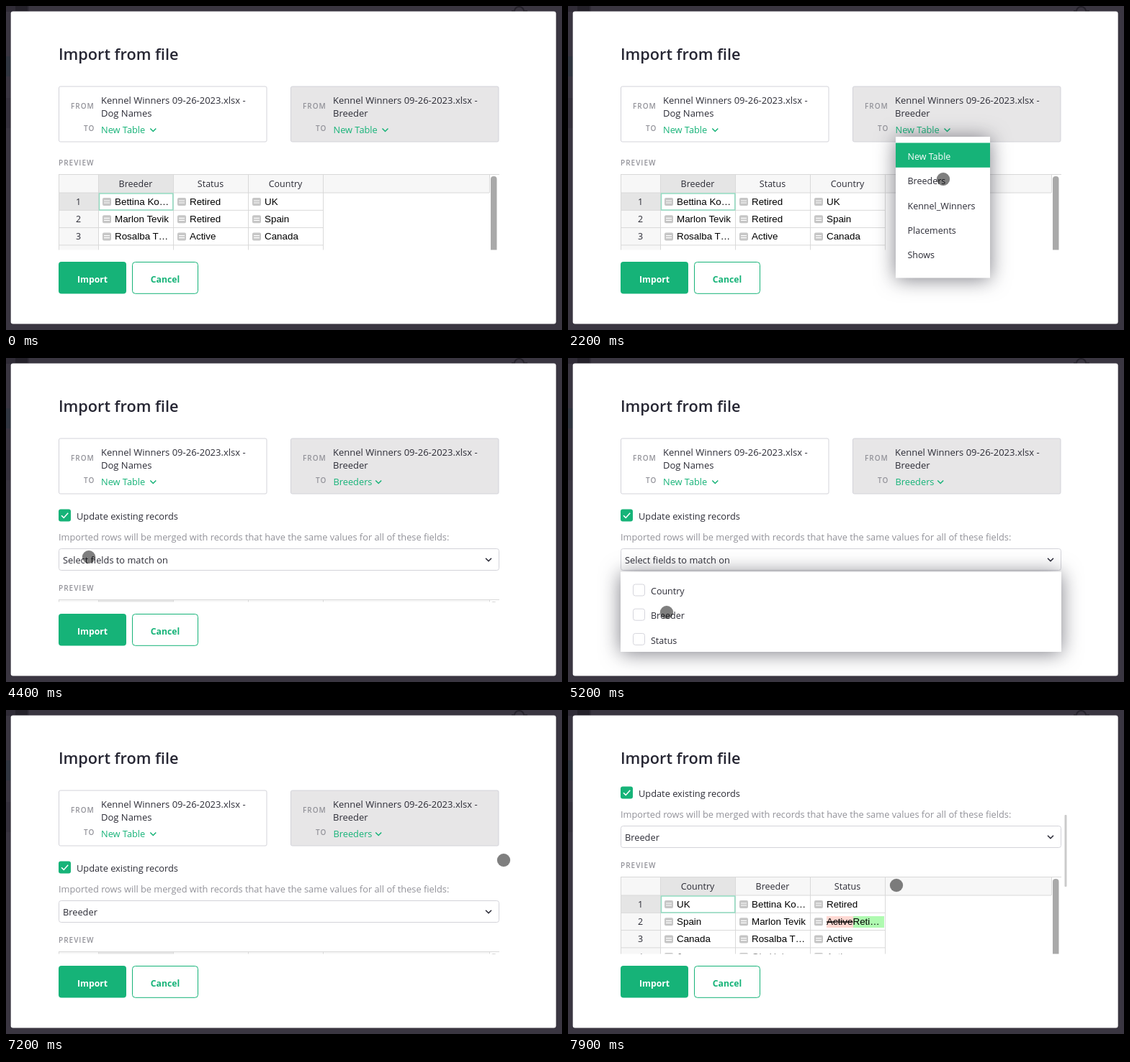
Animation of 772x451 px, one loop 8 s. Source, as an HTML page:

```html
<!DOCTYPE html>
<html lang="en">
<head>
<meta charset="utf-8">
<title>Import from file</title>
<style>
html, body { margin: 0; width: 100%; height: 100%; overflow: hidden; background: #3a3641; }
svg { display: block; width: 772px; height: 451px; }
text { font: 12.8px "Open Sans", "Noto Sans", sans-serif; fill: #2c2c36; white-space: pre; }
.title { font-size: 21.7px; font-weight: 600; fill: #262633; }
.file { font-size: 13px; }
.label { font-size: 10px; font-weight: 600; letter-spacing: 1px; fill: #929299; }
.note { fill: #929299; }
.link { fill: #16b378; }
.light { fill: #fff; }
.mid { font-size: 12.5px; text-anchor: middle; }
.button { font-size: 12.2px; font-weight: 700; }
.item { font-size: 12.5px; }
.cell { font: 13.4px "Liberation Sans", Arial, sans-serif; fill: #000; }
.menu { filter: drop-shadow(0 2px 14px rgba(38, 38, 51, .6)); }
</style>
</head>
<body>
<svg id="stage" viewBox="0 0 772 451"></svg>
<script>
const GREEN = '#16b378', LINE = '#d9d9d9';

const text = (x, y, s, cls = '') => `<text x="${x}" y="${y}" class="${cls}">${s}</text>`;
const rect = (x, y, w, h, fill, extra = '') =>
  `<rect x="${x}" y="${y}" width="${w}" height="${h}" fill="${fill}" ${extra}/>`;
const frame = (x, y, w, h, fill, stroke, r = 2) =>
  rect(x, y, w, h, fill, `stroke="${stroke}" rx="${r}"`);
const path = (d, stroke, width = 1.5) =>
  `<path d="${d}" fill="none" stroke="${stroke}" stroke-width="${width}"/>`;
const chevron = (x, y, color) => path(`M${x} ${y}l4 4l4-4`, color);
const group = (id, body, extra = '') => `<g id="${id}" ${extra}>${body}</g>`;
const emptyBox = (x, y) => frame(x + .5, y + .5, 16, 16, '#fff', '#d5d5dc', 3);
const tickedBox = (x, y) => rect(x, y, 17, 17, GREEN, 'rx="3"') +
  path(`M${x + 4} ${y + 8.7}l3.2 3.2l6-6.6`, '#fff');

function card(x, sheet, fill, targets) {
  return frame(x + .5, 112, 288.5, 77, fill, '#d3d3d9') +
    text(x + 17, 143, 'FROM', 'label') + text(x + 35, 174, 'TO', 'label') +
    text(x + 59, 136, 'Kennel Winners 09-26-2023.xlsx -', 'file') +
    text(x + 59, 153.5, sheet, 'file') + targets;
}

const target = (x, name, arrow) => text(x, 176.5, name, 'link') + chevron(arrow, 170.5, GREEN);

const records = [
  { Breeder: 'Bettina Ko…', Status: 'Retired', Country: 'UK' },
  { Breeder: 'Marlon Tevik', Status: 'Retired', Country: 'Spain' },
  { Breeder: 'Rosalba T…', Status: 'Active', Country: 'Canada' },
  { Breeder: 'Gia Hoben', Status: 'Active', Country: 'Japan' }
];

const changedCell = (x, y) =>
  rect(x, y - 12, 37, 16, '#ffd9d3') + rect(x + 37, y - 12, 43, 16, '#affab0') +
  text(x, y, '<tspan text-decoration="line-through">Active</tspan><tspan>Reti…</tspan>', 'cell');

// Table drawn from its own top edge
function table(columns, withChange) {
  let out = rect(73, 0, 598, 26, '#f7f7f7') + rect(73, 26, 55, 90, '#f7f7f7') +
    rect(129, 1, 103, 25, '#e5e5e5') + rect(73, 26, 55, 24, '#e5e5e5') +
    path('M73 .5H685M73 26H671M73.5 0V120M128.5 0V120M671.5 0V26', LINE, 1);
  columns.forEach((name, c) => {
    const x = 128 + c * 104;
    out += text(x + 52, 18.3, name, 'mid') + path(`M${x + 104.5} 0V120`, LINE, 1);
    records.forEach((record, r) => {
      const y = 38 + r * 24.3;
      out += rect(x + 6, y - 5, 12, 11, '#c6c6c6', 'rx="2"') +
        path(`M${x + 8} ${y - 1}h8m-8 3h8`, '#fff', 1.2);
      out += withChange && r === 1 && name === 'Status'
        ? changedCell(x + 23, y + 4.7)
        : text(x + 23, y + 4.7, record[name], 'cell');
    });
  });
  records.forEach((_, r) => {
    const y = 38 + r * 24.3;
    out += text(100.5, y + 4.7, r + 1, 'mid') + path(`M73 ${y + 12.3}H441`, LINE, 1);
  });
  return out + rect(129.5, 27, 102.3, 23, 'none', 'stroke="#97dcc3" stroke-width="1.6"') +
    rect(673, 3, 8.5, 140, '#a9a9a9', 'rx="4"');
}

const imported = ['Breeder', 'Status', 'Country'];
const matched = ['Country', 'Breeder', 'Status'];
const tableNames = ['New Table', 'Breeders', 'Kennel_Winners', 'Placements', 'Shows'];

const backdrop = rect(0, 0, 772, 451, '#3a3641') +
  rect(0, 0, 32, 8, '#302c37') + rect(13, 0, 17, 7, '#25222b') +
  rect(0, 70, 7, 28, '#303640') + rect(0, 128, 7, 42, '#35313c') +
  path('M702 7h4a6.5 6 0 0 1 13 0h5', '#25222b', 2);

const content =
  card(73, 'Dog Names', '#fff', target(132, 'New Table', 200.3)) +
  card(395, 'Breeder', '#e7e6e7',
    group('toNew', target(454.5, 'New Table', 522.5)) +
    group('toBreeders', target(454.5, 'Breeders', 513.2))) +
  group('update', group('unticked', emptyBox(73, 211)) + group('ticked', tickedBox(73, 210.5)) +
    text(98, 225, 'Update existing records')) +
  group('match',
    text(73, 253.5, 'Imported rows will be merged with records that have the same values for all of these fields:', 'note') +
    frame(73.5, 265.5, 611, 30, '#fff', '#d3d3d9', 3) +
    group('noField', text(79, 285.5, 'Select fields to match on')) +
    group('oneField', text(79, 285.5, 'Breeder')) +
    chevron(666, 278.7, '#262633')) +
  group('preview', text(73, 222, 'PREVIEW', 'label') +
    ['tableNew', 'tableOld', 'tableDiff'].map((id, i) =>
      group(id, table(i ? matched : imported, i === 2), 'transform="translate(0 234)"')).join(''));

const buttons = rect(73, 356, 94, 44.6, GREEN, 'rx="4"') +
  frame(175.5, 356.5, 91, 43.8, '#fff', GREEN, 4) +
  text(120, 384.5, 'Import', 'mid button light') + text(221, 384.5, 'Cancel', 'mid button link');

const tableMenu = rect(455, 182, 131, 196.5, '#fff', 'class="menu"') +
  rect(455, 190.5, 131, 34.3, GREEN) +
  tableNames.map((name, i) =>
    text(471.5, 214 + i * 34.25, name, i ? 'item' : 'item light')).join('');

const fieldMenu = rect(73, 297.5, 612, 111.5, '#fff', 'class="menu"') +
  matched.map((name, i) => emptyBox(90, 314.5 + i * 34.2) +
    text(115, 329 + i * 34.3, name, 'item')).join('') +
  group('fieldTick', tickedBox(90, 348.7));

const stage = document.getElementById('stage');
stage.innerHTML =
  '<clipPath id="view"><rect x="60" y="98" width="640" height="241.5"/></clipPath>' +
  backdrop + rect(6.7, 7.5, 757, 435, '#fff', 'rx="3"') +
  text(73, 75, 'Import from file', 'title') +
  `<g clip-path="url(#view)">${group('content', content)}</g>` + buttons +
  rect(689.5, 103, 3, 100, '#cbcbcb', 'id="thumb" rx="1"') +
  group('tableMenu', tableMenu) + group('fieldMenu', fieldMenu) +
  '<circle id="cursor" r="9" fill-opacity=".5" stroke="#000" stroke-opacity=".12"/>';

const part = {};
stage.querySelectorAll('[id]').forEach(el => part[el.id] = el);

const show = (id, on) => part[id].style.display = on ? '' : 'none';
const move = (id, x, y) => part[id].setAttribute('transform', `translate(${x} ${y})`);
const ease = (t, from, to) => {
  const p = Math.min(1, Math.max(0, (t - from) / (to - from)));
  return p * p * (3 - 2 * p);
};

// Pointer moves: start, end, x, y
const moves = [
  [0, 200, 640, 228], [200, 900, 526, 173], [1500, 2100, 521, 241],
  [2550, 3150, 79, 220], [3750, 4300, 115, 277], [4650, 5150, 137, 354],
  [5250, 5550, 98, 357], [5850, 6350, 490, 290], [6350, 6750, 691, 209],
  [7250, 7600, 456, 244]
];

function pointer(t) {
  let [, , x, y] = moves[0];
  for (const [from, to, nextX, nextY] of moves) {
    const p = ease(t, from, to);
    x += (nextX - x) * p;
    y += (nextY - y) * p;
  }
  return [x, y];
}

function draw(t) {
  const chosen = t >= 2400, merging = t >= 3500, field = t >= 5700;
  const scroll = 104 * ease(t, 7400, 7700);

  show('toNew', !chosen);
  show('toBreeders', chosen);
  show('update', chosen);
  show('unticked', !merging);
  show('ticked', merging);
  show('match', merging);
  show('noField', !field);
  show('oneField', field);
  show('fieldTick', field);
  show('tableNew', !chosen);
  show('tableOld', chosen && !field);
  show('tableDiff', field);
  show('tableMenu', t >= 1300 && !chosen);
  show('fieldMenu', t >= 4500 && t < 6800);
  show('thumb', t >= 7400);
  show('cursor', t >= 200);

  move('preview', 0, merging ? 102 : chosen ? 36 : 0);
  move('content', 0, -scroll);
  move('thumb', 0, scroll * 43 / 104);
  move('cursor', ...pointer(t));
}

const start = performance.now();
function tick() {
  draw((performance.now() - start) % 8000);
  requestAnimationFrame(tick);
}
tick();
</script>
</body>
</html>
```
